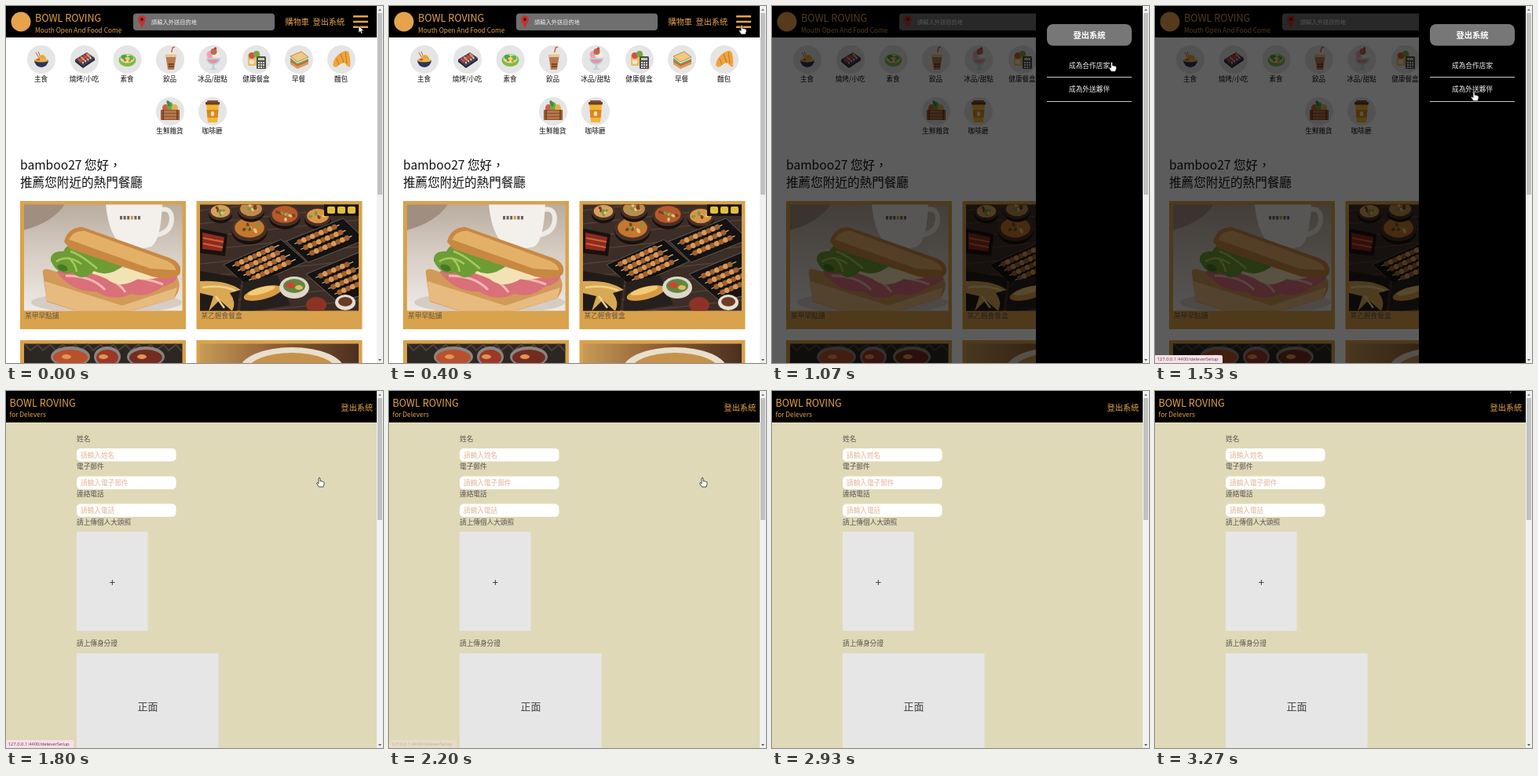
Animation of 480 by 454 pixels, one loop 3540 ms. Source, as an HTML page with a canvas:

```html
<!DOCTYPE html>
<html lang="zh-Hant">
<head>
<meta charset="utf-8">
<title>Food delivery</title>
<style>
html, body { margin: 0; width: 100%; height: 100%; overflow: hidden; background: #fff; }
canvas { display: block; width: 480px; height: 454px; }
</style>
</head>
<body>
<canvas id="stage"></canvas>
<script>
const W = 480, H = 454, LOOP = 3540, STEP = 1000 / 15;
const GOLD = '#e6a34c', CARD = '#d9a24c';
const SANS = '"Noto Sans CJK TC", "Noto Sans CJK", "Noto Sans", sans-serif';
const BRAND = 'BOWL ROVING';
const canvas = document.getElementById('stage');
const c = canvas.getContext('2d');
const scale = Math.max(1, window.devicePixelRatio || 1);
canvas.width = W * scale;
canvas.height = H * scale;

function rect(x, y, w, h, fill, r = 0) {
  c.fillStyle = fill;
  c.beginPath();
  c.roundRect(x, y, w, h, r);
  c.fill();
}
function oval(x, y, rx, ry, fill, turn = 0) {
  c.fillStyle = fill;
  c.beginPath();
  c.ellipse(x, y, rx, ry, turn, 0, 7);
  c.fill();
}
function half(x, y, rx, ry, fill) {
  c.fillStyle = fill;
  c.beginPath();
  c.ellipse(x, y, rx, ry, 0, 0, Math.PI);
  c.fill();
}
function trace(d, fill, stroke, width = 1) {
  const p = new Path2D(d);
  if (fill) { c.fillStyle = fill; c.fill(p); }
  if (stroke) { c.strokeStyle = stroke; c.lineWidth = width; c.stroke(p); }
}
// y is the middle of the glyphs
function text(s, x, y, size, fill, align = 'left', weight = 400, family = SANS) {
  c.font = `${weight} ${size}px ${family}`;
  c.textAlign = align;
  c.fillStyle = fill;
  c.fillText(s, x, y + size * 0.38);
}
function at(x, y, draw) {
  c.save();
  c.translate(x, y);
  draw();
  c.restore();
}
function clip(x, y, w, h, draw) {
  c.save();
  c.beginPath();
  c.rect(x, y, w, h);
  c.clip();
  draw();
  c.restore();
}
function random(seed) {
  return () => (seed = seed * 16807 % 2147483647) / 2147483647;
}

const icons = {
  noodles() {
    trace('M-7 -9 L-1 2 M-4 -10 L1 2', null, '#a5672f', 1);
    oval(1, -1, 5, 5, '#f3bd3d');
    trace('M-3 -1 Q1 -8 5 -1 M-1 0 Q1 -5 3 0', null, '#dd8b25', 1);
    half(0, 1, 9, 9, '#2c3557');
    oval(0, 1, 9, 2.4, '#e9b34a');
    oval(-4, 0, 2.5, 1.6, '#d65a36');
  },
  grill() {
    trace('M-12 0 L3 -9 L13 -2 L-2 8 Z', '#343a5c');
    trace('M-12 0 L-2 8 L13 -2 V1 L-2 11 L-12 3 Z', '#20243c');
    for (let i = 0; i < 4; i++) {
      oval(-6 + i * 3.6, 1 - i * 2, 1.7, 3.6, i % 2 ? '#e9894d' : '#cf4b3b', -0.8);
      oval(-2 + i * 3.2, 4 - i * 2, 1.2, 1.5, '#f0c79a');
    }
  },
  salad() {
    oval(0, 1, 11, 8, '#7fbb45');
    oval(0, -1, 9, 5.5, '#d9e8a2');
    oval(-4, -3, 4, 3, '#48a24d');
    oval(4, -2, 4, 3, '#5cb257');
    oval(0, -1, 3, 2.3, '#f4d15a');
    oval(-3, 1, 1.8, 1.6, '#e2574c');
    oval(3, 2, 1.8, 1.4, '#e98743');
  },
  drink() {
    trace('M1 -5 L3 -15 L6 -16', null, '#d85846', 1.4);
    trace('M-6 -7 H8 L5 13 H-3 Z', '#b77b4b');
    trace('M-6 -7 H8 L7.5 -3 H-5.5 Z', '#e5c5a2');
    rect(-7, -9, 16, 2.6, '#f2e3d1', 1);
    for (let i = 0; i < 6; i++) oval(-1 + i % 3 * 2.4, 6 + (i / 3 | 0) * 3, 1.1, 1.1, '#553020');
  },
  sundae() {
    oval(-3, -6, 5, 5, '#f0a0b8');
    oval(4, -5, 5, 5, '#f9edd8');
    oval(1, -10, 4, 4, '#b76a55');
    oval(3, -14, 1.7, 1.7, '#d53345');
    trace('M-9 -2 H10 Q8 6 2 7 V11 L6 13 H-5 L-1 11 V7 Q-7 6 -9 -2 Z', '#b9d3dc');
    trace('M-7 0 H8 Q5 5 0 5 Q-5 5 -7 0 Z', '#e992a2');
  },
  lunchbox() {
    rect(-11, -7, 16, 15, '#e8bd62', 2);
    oval(-6, -5, 4, 4, '#d6503f');
    oval(0, -7, 4, 4, '#70a944');
    oval(-6, 3, 3.5, 3, '#f1e3c6');
    rect(0, -4, 12, 16, '#4d4a50', 1.5);
    rect(2, -2, 8, 3, '#b9d6a4');
    for (let i = 0; i < 9; i++) rect(2 + i % 3 * 3, 3 + (i / 3 | 0) * 3, 2, 2, i === 8 ? '#e08a3c' : '#e5e2dd');
  },
  sandwich() {
    trace('M-11 -4 L3 -10 L12 -3 L-2 3 Z', '#f1c884', '#c98540', 1);
    trace('M-11 -2 L-2 5 L12 -1 V2 L-2 8 L-11 1 Z', '#64a74c');
    trace('M-11 1 L-2 7 L12 1 V3 L-2 9 L-11 3 Z', '#d75a45');
    trace('M-11 3 L-2 9 L12 3 V6 L-2 12 L-11 6 Z', '#d99a4c');
  },
  croissant() {
    trace('M-11 7 Q-10 -3 0 -9 Q9 -14 10 -7 Q12 0 11 9 Q7 10 4 4 Q-2 5 -5 9 Q-9 11 -11 7 Z', '#efa53f');
    trace('M-6 -1 L-3 7 M-1 -7 L3 4 M5 -10 L7 5', null, '#c97722', 1.1);
  },
  crate() {
    oval(-6, -4, 4, 5, '#d95a43');
    oval(0, -6, 4, 6, '#6fa848');
    oval(6, -4, 4, 5, '#e5b04b');
    oval(-2, -10, 2, 4, '#3f8a45', -0.4);
    rect(-12, -2, 24, 13, '#8c5434', 1);
    for (let i = 0; i < 3; i++) rect(-11, -1 + i * 4, 22, 3, '#b37649');
    rect(-10, -2, 2, 13, '#75432a');
    rect(8, -2, 2, 13, '#75432a');
  },
  coffee() {
    trace('M-8 -9 H8 L6 14 H-6 Z', '#f2b632');
    trace('M-7.5 -2 H7.5 L6.6 8 H-6.6 Z', '#d98826');
    rect(-9, -12, 18, 3.5, '#6b3a27', 1);
    rect(-7, -14, 14, 2.5, '#84503a', 1);
    oval(0, 3, 2.2, 3, '#f8e2a8');
  }
};

const menu = [
  ['noodles', '主食', 45, 68], ['grill', '燒烤/小吃', 100, 68], ['salad', '素食', 154.5, 68],
  ['drink', '飲品', 209, 68], ['sundae', '冰品/甜點', 263.5, 68], ['lunchbox', '健康餐盒', 319, 68],
  ['sandwich', '早餐', 373, 68], ['croissant', '麵包', 427, 68],
  ['crate', '生鮮雜貨', 209, 134], ['coffee', '咖啡廳', 263, 134]
];

function sandwichPhoto() {
  const g = c.createLinearGradient(0, 252, 0, 388);
  g.addColorStop(0, '#b9aca0');
  g.addColorStop(0.45, '#d6ccc2');
  g.addColorStop(1, '#eeeae6');
  rect(23, 252, 202, 136, g);
  trace('M23 252 H75 Q60 275 23 285 Z', '#a08e80');
  trace('M188 262 Q210 252 211 270 Q211 290 186 292', null, '#eeeae5', 6);
  trace('M127 252 H199 Q197 298 185 306 Q160 313 143 300 Q130 285 127 252 Z', '#f3f0ec');
  for (let i = 0; i < 6; i++) rect(145 + i * 4.6, 267, 3, 4.5, i === 3 ? '#c79c43' : '#6c635b');
  oval(128, 377, 96, 14, '#d5ccc4');
  trace('M47 341 Q45 333 55 335 L152 366 L218 345 Q225 358 214 372 L160 388 H90 L52 376 Z', '#d29a58');
  trace('M49 350 L148 381 L218 358 L214 372 L158 388 H92 L52 375 Z', '#e7bb7f');
  trace('M64 338 Q90 326 126 338 L218 340 Q220 352 199 357 Q180 372 160 366 Q135 377 115 363 Q85 365 64 338 Z', '#d9707a');
  trace('M76 343 Q110 343 126 361 M110 339 Q140 346 152 364 M150 344 Q180 346 200 354', null, '#f3b8b2', 3);
  trace('M92 332 L214 336 Q190 351 168 347 Q145 361 128 347 Z', '#f3e3b4');
  trace('M57 324 Q56 311 73 312 Q79 299 96 305 L150 330 Q130 346 112 337 Q98 352 85 339 Q66 344 57 324 Z', '#6d9c34');
  trace('M64 325 Q78 315 96 328 M82 312 Q95 316 116 334 M90 338 Q88 326 79 320', null, '#a6c95c', 2.5);
  oval(72, 333, 7, 4, '#4a7725', 0.4);
  trace('M74 300 Q78 282 97 281 L210 321 Q226 328 221 341 Q213 350 186 344 L82 309 Z', '#c88842');
  trace('M80 297 Q86 285 100 286 L205 324 Q217 330 216 336 L184 334 Z', '#e4b068');
}

function bowl(x, y, r, food, seed) {
  const rnd = random(seed);
  oval(x, y + 3, r, r * 0.75, '#16110f');
  oval(x, y, r, r * 0.7, '#4a3026');
  oval(x, y - 1, r * 0.82, r * 0.54, food);
  for (let i = 0; i < 9; i++) {
    const a = rnd() * 7, d = rnd() * r * 0.6;
    oval(x + Math.cos(a) * d, y - 1 + Math.sin(a) * d * 0.6, 2.6, 1.8, ['#e5c27c', '#803c20', '#7a9a3f'][i % 3], a);
  }
}
function skewer(x, y, len, turn) {
  at(x, y, () => {
    c.rotate(turn);
    rect(-4, -0.6, len + 12, 1.2, '#d9b981');
    for (let i = 0; i < len; i += 6) oval(i + 3, 0, 3.5, 3.4, i % 12 ? '#d79a56' : '#a3602f');
  });
}
function grillPhoto() {
  rect(247, 252, 203, 136, '#3c2d26');
  for (let i = 0; i < 9; i++) trace(`M247 ${260 + i * 17} L450 ${238 + i * 17}`, null, '#544036', 1.5);
  trace('M247 283 L282 290 L279 318 L247 314 Z', '#18120f');
  trace('M250 288 L278 294 L275 312 L250 309 Z', '#8e2a1f');
  trace('M251 295 L277 300 M251 302 L276 307', null, '#c9653a', 2);
  bowl(273, 262, 15, '#d3a15b', 11);
  bowl(310, 283, 23, '#c5782f', 23);
  bowl(312, 259, 17, '#bd8b4c', 35);
  bowl(355, 266, 20, '#b65a2c', 47);
  bowl(397, 268, 17, '#d89547', 59);
  trace('M277 329 L350 297 L382 325 L308 357 Z', '#11100f', '#5a5450', 1);
  for (let i = 0; i < 4; i++) skewer(292 + i * 7, 329 + i * 6, 53, -0.42);
  trace('M357 299 L429 270 L450 290 V300 L385 326 Z', '#141212', '#615a55', 1);
  for (let i = 0; i < 3; i++) skewer(371 + i * 8, 301 + i * 7, 50, -0.4);
  trace('M382 341 L450 313 V369 L421 375 Z', '#151313', '#645d57', 1);
  for (let i = 0; i < 4; i++) skewer(398 + i * 8, 344 + i * 7, 40, -0.4);
  trace('M247 337 L300 346 L294 388 H247 Z', '#211b18');
  trace('M247 350 Q280 348 299 361 L285 365 Q294 377 288 388 L272 374 L258 388 L264 369 L247 365 Z', '#d8a855');
  trace('M250 358 Q275 354 292 362 M267 369 L278 384', null, '#f0d28b', 2.5);
  trace('M302 351 L345 342 L362 380 L315 388 H298 Z', '#25201d');
  oval(327, 365, 25, 8, '#d99b45', -0.25);
  oval(325, 362, 18, 4, '#f0cc78', -0.25);
  oval(367, 358, 19, 14, '#ded7c9');
  oval(367, 356, 14, 9, '#618641');
  oval(362, 355, 6, 4, '#c44931');
  oval(373, 358, 5, 3, '#e9b758');
  oval(395, 380, 13, 10, '#8c3325');
  oval(432, 377, 13, 10, '#e5dfd4');
  oval(432, 376, 9, 6, '#6b3c22');
  rect(405, 252, 45, 15, '#17120c');
  for (let i = 0; i < 3; i++) rect(409 + i * 13, 255, 10, 9, '#e3bf3d', 2);
}
function curryPhoto() {
  rect(23, 429, 202, 25, '#2d2724');
  for (let i = 0; i < 14; i++) trace(`M${23 + i * 16} 429 l8 9 l9 -7`, null, '#4b423c', 2);
  for (const [x, w, f] of [[82, 25, '#b9502d'], [129, 17, '#9b3827'], [178, 24, '#742c20']]) {
    oval(x, 446, w, 13, '#8c8580');
    oval(x, 447, w - 3, 10, f);
    oval(x - 5, 446, 6, 3, '#e09650');
  }
}
function soupPhoto() {
  const g = c.createLinearGradient(247, 0, 450, 0);
  g.addColorStop(0, '#c79a55');
  g.addColorStop(0.5, '#8b5b34');
  g.addColorStop(1, '#4a2f20');
  rect(247, 429, 203, 25, g);
  oval(364, 462, 66, 28, '#e9dfcd');
  oval(364, 464, 57, 23, '#c6924b');
}

function card(x, y, photo, name) {
  rect(x, y, 211, 163, CARD);
  clip(x + 4.5, y + 4.5, 202, 135, photo);
  if (name) text(name, x + 6, 394, 8.7, '#65543f', 'left', 500);
}

function scrollbar(end) {
  rect(472, 0, 8, H, '#f1f1f1');
  rect(473, 9, 6, end - 9, '#c1c1c1');
  trace('M474 6 L476 3.5 L478 6 Z', '#777');
  trace('M474 449 L476 451.5 L478 449 Z', '#555');
}

function home() {
  rect(0, 0, W, H, '#fff');
  rect(0, 0, 472, 40, '#000');
  oval(19, 20, 12.5, 12.5, GOLD);
  text(BRAND, 37, 15.5, 12.6, GOLD);
  text('Mouth Open And Food Come', 37, 30.5, 8.25, GOLD, 'left', 500);
  rect(162, 9.5, 180, 21.5, '#6f6f6f', 4);
  trace('M173 28 L168.5 19 Q167 12 173 12 Q179 12 177.5 19 Z', '#c9302b');
  oval(173, 17, 2, 2, '#4b1a18');
  text('請輸入外送目的地', 185, 20.5, 7.25, '#eee');
  text('購物車', 355.5, 20.5, 10.2, GOLD, 'left', 500);
  text('登出系統', 390.5, 20.5, 10.2, GOLD, 'left', 500);
  for (let i = 0; i < 3; i++) rect(442, 12 + i * 6.7, 19, 2.6, GOLD, 0.5);
  for (const [icon, label, x, y] of menu) {
    oval(x, y, 18, 18, '#e5e5e5');
    at(x, y, icons[icon]);
    text(label, x - 0.5, y + 24.5, 8.6, '#111', 'center');
  }
  text('bamboo27 您好，', 18, 202, 15.6, '#111');
  text('推薦您附近的熱門餐廳', 18, 224.5, 15.6, '#111');
  card(18, 248, sandwichPhoto, '某甲早點舖');
  card(242.5, 248, grillPhoto, '某乙輕食餐盒');
  card(18, 425, curryPhoto);
  card(242.5, 425, soupPhoto);
}

function drawer() {
  rect(0, 0, 472, H, 'rgba(0,0,0,.64)');
  rect(336, 0, 136, H, '#000');
  rect(350, 23, 108, 27.5, '#777', 8);
  text('登出系統', 404, 37, 10.3, '#fff', 'center', 700);
  text('成為合作店家', 404, 75.5, 8.7, '#eee', 'center');
  text('成為外送夥伴', 404, 106, 8.7, '#eee', 'center');
  rect(350, 90, 108, 1, '#c8c8c8');
  rect(350, 121, 108, 1, '#c8c8c8');
}

function form() {
  rect(0, 0, W, H, '#e0d9b8');
  rect(0, 0, 472, 40, '#000');
  text(BRAND, 4.5, 15, 12.6, GOLD);
  text('for Delevers', 4.5, 30, 8.4, GOLD, 'left', 500);
  text('登出系統', 426.5, 21, 10.2, GOLD, 'left', 500);
  const ink = '#57534c';
  const label = (s, y) => text(s, 90, y, 8.65, ink, 'left', 500);
  const field = (name, hint, y) => {
    label(name, y);
    rect(90, y + 12.5, 126.5, 16.5, '#fff', 5);
    text(hint, 95, y + 21, 8.65, '#e6b295');
  };
  field('姓名', '請輸入姓名', 60.5);
  field('電子郵件', '請輸入電子郵件', 96);
  field('連絡電話', '請輸入電話', 131);
  label('請上傳個人大頭照', 167);
  rect(90, 179, 90.5, 126, '#e6e6e6');
  text('+', 135.3, 243, 13, '#333', 'center');
  label('請上傳身分證', 321);
  rect(90, 333.5, 180.5, 121, '#e6e6e6');
  text('正面', 180.5, 401.5, 13, '#444', 'center');
}

function status(alpha) {
  if (alpha <= 0) return;
  c.globalAlpha = Math.min(1, alpha);
  rect(0, 444, 86, 10, '#fbdfe8', [0, 2, 0, 0]);
  text('127.0.0.1:4400/deleverSetup', 2.5, 449.2, 5.9, '#4d4347', 'left', 400, '"Open Sans", sans-serif');
  c.globalAlpha = 1;
}

// time, x, y of the pointer tip
const path = [
  [0, 449, 25], [400, 449, 24], [467, 449, 25], [800, 449, 25], [1267, 420, 106],
  [1333, 420, 106], [1533, 399, 110], [2400, 399, 110], [2600, 438, 15], [2933, 452, -15], [LOOP, 452, -15]
];
function tip(t) {
  const i = path.findIndex(k => k[0] > t);
  const [t0, x0, y0] = path[i - 1], [t1, x1, y1] = path[i];
  const f = (t - t0) / (t1 - t0);
  return [x0 + (x1 - x0) * f, y0 + (y1 - y0) * f];
}

function pointer(t) {
  const [x, y] = tip(t);
  const arrow = t < 190 || (t < 1800 && y > 50 && y < 60) || (t > 2410 && (y > 30 || y < 10));
  at(x, y, () => {
    c.lineJoin = 'round';
    if (arrow) trace('M0 0 V9 L2 7.2 L3.5 10.2 L5 9.5 L3.7 6.6 H6.4 Z', '#fff', '#222', 0.7);
    else trace('M-1 1 Q0 -0.7 1.1 1 V4.6 Q2.4 4 3 5 Q4.2 4.4 4.7 5.5 Q6 5.1 6 6.6 V8.6 L4.8 12 H-0.5 L-3.4 7.8 Q-3.4 6.3 -2 6.8 L-1 7.8 Z', '#fff', '#222', 0.8);
  });
}

function draw(t) {
  const beat = Math.floor((t + 1) / STEP) * STEP;
  c.setTransform(scale, 0, 0, scale, 0, 0);
  c.textBaseline = 'alphabetic';
  if (t < 1800) {
    home();
    if (t >= 470) drawer();
    status((beat - 1130) / 130);
    scrollbar(240);
  } else {
    form();
    status((2270 - beat) / 250);
    scrollbar(164);
  }
  if (t < 2930) pointer(beat);
  else if (t >= 3000) rect(452, 1, 1.5, 1, '#999');
}

const start = performance.now();
function tick() {
  draw((performance.now() - start) % LOOP);
  requestAnimationFrame(tick);
}
tick();
</script>
</body>
</html>
```
